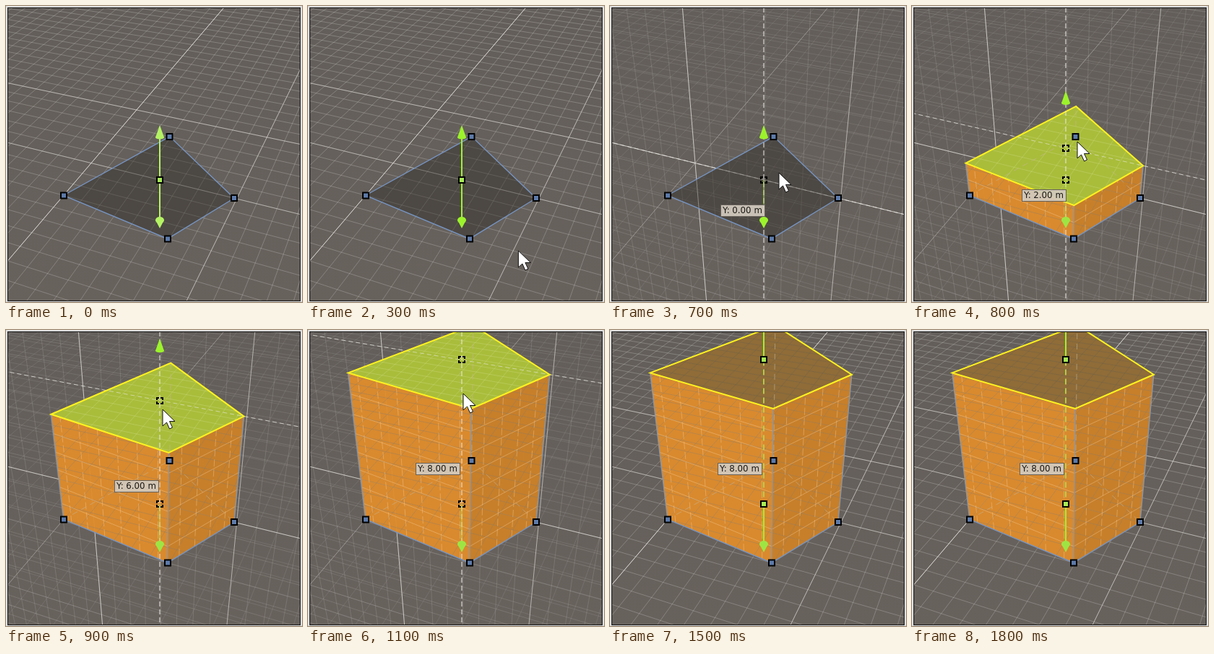
These frames come from a looping animation (410 by 410 pixels, 1.9 s). An HTML page with a canvas:

```html
<!DOCTYPE html>
<html lang="en">
<head>
<meta charset="utf-8">
<title>Extruding a polygon</title>
<style>
  html, body { margin: 0; width: 100%; height: 100%; overflow: hidden; background: #ddd; }
  canvas { display: block; }
</style>
</head>
<body>
<canvas id="stage" width="410" height="410"></canvas>
<script>
const ctx = document.getElementById('stage').getContext('2d');
const LOOP = 1900, STEP = 100, DRAG = 700, RELEASE = 1300, LEAVE = 1500;
const BASE = [[0, 0], [7, 2.92], [3, 7.87], [-1, 5.93]];   // left, back, right, front
const CENTER = [3, 3.93];
const GREEN = '#9cf32c', PALE = '#b4f264', BLUE = '#7695c4';

// Perspective view of the ground point (a, b) raised by h metres.
function project(a, b, h = 0) {
  const w = 1 + .02393 * a - .01033 * b - .0192 * h;
  return [(79.8 + 15.55 * a + 23.7 * b - 4.09 * h) / w,
          (262.3 - 9.7 * a + 3.87 * b - 26.5 * h) / w];
}

function trace(points, close) {
  ctx.beginPath();
  points.forEach(p => ctx.lineTo(...p));
  if (close) ctx.closePath();
}

function fill(points, color) {
  trace(points, true);
  ctx.fillStyle = color;
  ctx.fill();
}

function stroke(points, color, width = 1, dash = [], close = false) {
  trace(points, close);
  ctx.strokeStyle = color;
  ctx.lineWidth = width;
  ctx.setLineDash(dash);
  ctx.stroke();
  ctx.setLineDash([]);
}

const white = alpha => `rgba(235,232,228,${alpha})`;
const lineA = b => [project(-10, b), project(34, b)];
const lineB = (a, h) => [project(a, -24, h), project(a, 20, h)];
const upright = b => [project(3, b, -14), project(3, b, 15)];

function groundGrid(color) {
  for (let b = -22; b <= 18; b++) stroke(lineA(b), color);
  for (let a = -10; a <= 32; a++) stroke(lineB(a), color);
}

function drawGrid(dragging, h) {
  groundGrid(white(dragging ? .1 : .24));
  if (!dragging) {
    stroke(lineA(0), white(.85));
    stroke(lineA(8), white(.5));
    stroke(lineB(3), white(.45));
    stroke(lineB(9), white(.5));
    return;
  }
  for (let b = -14; b <= 16; b++) stroke(upright(b), white(.14));
  for (let y = -14; y <= 15; y++) stroke(lineB(3, y), white(.14));
  stroke(lineA(0), white(.3));
  stroke(lineB(3), white(.65));
  stroke(upright(0), white(.7));
  stroke(upright(8), white(.5));
  stroke(lineB(3, h), white(.75), 1, [6, 4]);
}

function drawSide(p, q, h, color) {
  const along = (s, y) => project(p[0] + (q[0] - p[0]) * s, p[1] + (q[1] - p[1]) * s, y);
  const length = Math.hypot(q[0] - p[0], q[1] - p[1]);
  const face = [along(0, 0), along(1, 0), along(1, h), along(0, h)];
  const tint = 'rgba(245,205,155,.4)';
  fill(face, color);
  ctx.save();
  trace(face, true);
  ctx.clip();
  groundGrid('rgba(125,122,115,.35)');
  for (let s = length / 2 % 1 + .5; s < length; s++) {
    stroke([along(s / length, 0), along(s / length, h)], tint, 1, [10, 4]);
  }
  for (let y = 1; y < h; y++) stroke([along(0, y), along(1, y)], tint);
  ctx.restore();
}

function drawBox(h, hovered, dragging) {
  const floor = BASE.map(p => project(...p));
  if (!h) {
    fill(floor, 'rgba(35,32,28,.38)');
    stroke(floor, BLUE, 1.3, [], true);
    return;
  }
  const roof = BASE.map(p => project(...p, h));
  const [left, , right, front] = BASE;
  drawSide(left, front, h, 'rgba(224,141,44,.95)');
  drawSide(front, right, h, 'rgba(205,129,40,.95)');
  fill(roof, !hovered ? '#8f6c38' : dragging ? '#a9bd3b' : '#b9c14e');
  ctx.save();
  trace(roof, true);
  ctx.clip();
  groundGrid(hovered ? 'rgba(215,225,150,.3)' : 'rgba(105,95,75,.4)');
  if (dragging) stroke(lineB(3, h), white(.6), 1, [6, 4]);
  ctx.restore();
  ctx.save();
  trace([...roof.slice(0, 3), floor[2], floor[3], floor[0]], true);
  ctx.clip();
  const hidden = 'rgba(195,180,150,.6)';
  stroke(floor.slice(0, 3), hidden, 1, [8, 6]);
  stroke([floor[1], roof[1]], hidden, 1, [8, 6]);
  ctx.restore();
  [0, 2, 3].forEach(i => stroke([floor[i], roof[i]], '#8898ae', 1.3));
  stroke([floor[0], floor[3], floor[2]], BLUE, 1.3);
  stroke(roof, '#fff31f', 2, [], true);
}

function arrow(x, tip, size, color, bulge) {
  const base = tip + size;
  fill([[x, tip], [x + 6, base], [x - 6, base]], color);
  ctx.beginPath();
  ctx.ellipse(x, base, 6, bulge, 0, 0, 7);
  ctx.fill();
}

function square([x, y], color, dash = []) {
  x = Math.round(x * 2) / 2;
  y = Math.round(y * 2) / 2;
  const box = [[x - 4, y - 4], [x + 4, y - 4], [x + 4, y + 4], [x - 4, y + 4]];
  if (color) fill(box, color);
  ctx.lineDashOffset = 3;
  stroke(box, '#000', 2, dash, true);
  ctx.lineDashOffset = 0;
}

function drawHandles(h, dragging, time) {
  const low = project(...CENTER), high = project(...CENTER, h);
  const x = 213, color = time < 300 ? PALE : GREEN;
  const tip = high[1] - 76 - h * 1.65;
  if (dragging) {
    stroke([[x, 2], [x, 408]], white(.8), 1.3, [7, 4]);
    stroke([[x, low[1]], [x, 296]], 'rgba(175,225,80,.7)', 1.5);
  } else {
    stroke([[x, tip + 16], [x, high[1]]], color, 2);
    if (h) stroke([high, low], '#b5d54b', 1.8, [8, 5]);
    stroke([[x, low[1]], [x, 296]], color, 2);
  }
  arrow(x, tip, 17, color, 2.5);
  arrow(x, 308, -11.5, h ? '#9ee543' : color, 4.5);
  BASE.forEach(p => square(project(...p), '#5d7aa9'));
  const dash = dragging ? [6, 2] : [];
  const middle = dragging ? null : '#a5ec55';
  square(low.map(Math.round), middle, dash);
  if (h) square(high.map(Math.round), middle, dash);
}

function drawLabel(h) {
  const x = Math.round(153.5 - h * .45);
  const y = Math.round(project(...CENTER, h / 2)[1] + 42.5);
  ctx.fillStyle = 'rgba(210,202,190,.93)';
  ctx.fillRect(x, y - 7, 60, 15);
  ctx.strokeStyle = '#67615b';
  ctx.lineWidth = 1;
  ctx.strokeRect(x - .5, y - 7.5, 61, 16);
  ctx.fillStyle = '#1b1916';
  ctx.font = '11.8px "DejaVu Sans", sans-serif';
  ctx.textBaseline = 'alphabetic';
  ctx.fillText(`Y: ${h.toFixed(2)} m`, x + 2, y + 4);
}

function drawCursor([x, y]) {
  const shape = [[0, 0], [0, 23], [5.5, 18], [9.5, 27], [13.5, 25], [9.5, 16.5], [17, 16.5]]
    .map(([dx, dy]) => [x + dx, y + dy]);
  fill(shape, '#fff');
  stroke(shape, '#111', 1, [], true);
}

function cursorAt(time) {
  if (time < 100 || time >= LEAVE) return null;
  if (time <= 600) {
    const left = 1 - (time - 100) / 500;
    return [238 + 89 * left, 273 + 110 * left];
  }
  return { 700: [234, 231], 800: [229, 188], 900: [217, 110], 1000: [216, 96],
           1100: [215, 88], 1200: [215, 88], 1300: [217, 87], 1400: [222, 85] }[time];
}

function heightAt(time) {
  if (time < 800) return 0;
  return { 800: 2, 900: 6, 1000: 7 }[time] || 8;
}

function draw(now) {
  const time = Math.floor(now % LOOP / STEP) * STEP;
  const dragging = time >= DRAG && time < RELEASE;
  const h = heightAt(time), cursor = cursorAt(time);
  const ground = ctx.createLinearGradient(0, 0, 0, 410);
  ground.addColorStop(0, '#635e5a');
  ground.addColorStop(1, '#68625d');

  ctx.fillStyle = '#ddd';
  ctx.fillRect(0, 0, 410, 410);
  ctx.save();
  ctx.beginPath();
  ctx.rect(2, 2, 406, 407);
  ctx.clip();
  ctx.fillStyle = ground;
  ctx.fillRect(0, 0, 410, 410);
  drawGrid(dragging, h);
  drawBox(h, time < LEAVE, dragging);
  drawHandles(h, dragging, time);
  if (time >= DRAG) drawLabel(h);
  if (cursor) drawCursor(cursor);
  ctx.restore();
  ctx.strokeStyle = '#111';
  ctx.lineWidth = 1;
  ctx.strokeRect(2.5, 2.5, 405, 406);
  requestAnimationFrame(() => draw(performance.now() - start));
}

const start = performance.now();
draw(0);
</script>
</body>
</html>
```
